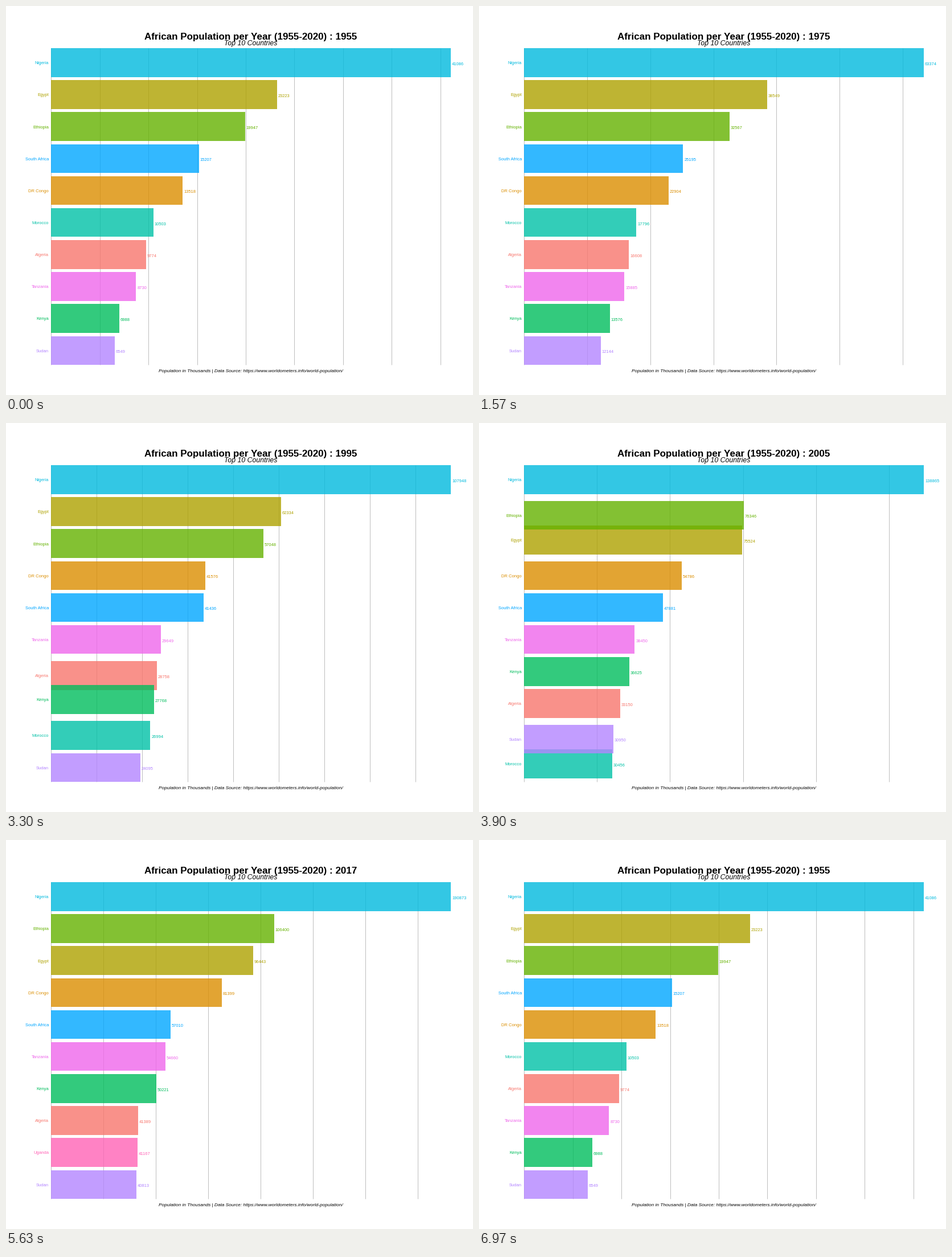
Recreate the animation shown at these times as a matplotlib script. Size 820 by 683 pixels, loop 10000 ms.

```python
import math

import numpy as np
import matplotlib.pyplot as plt
from matplotlib.animation import FuncAnimation
from matplotlib.patches import Rectangle

plt.rcParams["font.family"] = "Liberation Sans"

WIDTH, HEIGHT, DPI = 820, 683, 100
FRAMES, LOOP_MS = 300, 10000
LEFT, SPAN = 79.3, 702
TOP, PITCH, BAR = 74.2, 56.15, 50.5
TITLE = "African Population per Year (1955-2020) : {}"

# Population in thousands at the survey years; the other years are interpolated.
SURVEYS = [*range(1955, 2016, 5), 2017, 2020]
YEARS = [*range(1955, 2016, 5), *range(2016, 2021)]
COUNTRIES = {
    "Algeria": ("#F8766D", [9774, 11058, 12550, 14465, 16608, 19222, 22432, 25759,
                            28758, 31042, 33150, 35977, 39728, 41389, 43851]),
    "DR Congo": ("#DB8E00", [13518, 15248, 17370, 20011, 22904, 26358, 29881, 34612,
                             41576, 47106, 54786, 64564, 76245, 81399, 89561]),
    "Egypt": ("#AEA200", [23223, 26633, 30266, 34514, 38549, 43309, 49259, 56134,
                          62334, 68832, 75524, 82761, 92443, 96443, 102334]),
    "Ethiopia": ("#64B200", [19947, 22151, 25014, 28415, 32567, 35142, 40652, 47888,
                             57048, 66225, 76346, 87640, 100835, 106400, 114964]),
    "Kenya": ("#00BD5C", [6988, 8120, 9549, 11301, 13576, 16417, 19877, 23402,
                          27768, 31965, 36625, 42031, 47878, 50221, 53771]),
    "Morocco": ("#00C1A7", [10503, 12329, 14248, 16000, 17796, 20020, 22499, 24807,
                            26994, 28794, 30456]),
    "Nigeria": ("#00BADE", [41086, 45138, 50128, 55982, 63374, 73424, 83563, 95212,
                            107948, 122284, 138865, 158503, 181137, 190873, 206140]),
    "South Africa": ("#00A6FF", [15207, 17100, 19545, 22070, 25195, 28557, 32679, 36801,
                                 41436, 44968, 47881, 51217, 55386, 57010, 59309]),
    "Sudan": ("#B385FF", [6549, 7544, 8761, 10282, 12144, 14507, 17210, 20147,
                          24095, 27275, 30950, 34545, 38903, 40813, 43849]),
    "Tanzania": ("#EF67EB", [8730, 10052, 11684, 13606, 15885, 18538, 21634, 25204,
                             29649, 33499, 38450, 44347, 51483, 54660, 59734]),
    "Uganda": ("#FF63B6", [32428, 38225, 41167, 45741]),
}


def yearly(values):
    """Map year to population, filling recent gaps with a cubic."""
    years = SURVEYS[-4:] if len(values) == 4 else SURVEYS[:len(values)]
    table = dict(zip(years, values))
    if 2020 in table:
        cubic = np.polyfit(np.array(years[-4:]) - 2015, values[-4:], 3)
        for year in (2016, 2018, 2019):
            table[year] = int(round(np.polyval(cubic, year - 2015)))
    return table


def ranked(year):
    """Map each country of a year to (rank, population)."""
    rows = [(t[year], name) for name, t in TABLES.items() if year in t]
    return {name: (i, v) for i, (v, name) in enumerate(sorted(rows, reverse=True))}


TABLES = {name: yearly(values) for name, (_, values) in COUNTRIES.items()}
STATES = [(year, ranked(year)) for year in YEARS + [1955]]
STEPS = [9] * 8 + [8] + [9] * 4 + [8] * 5
REST = 3


def locate(frame):
    """Return the state a frame leaves and how far it is to the next one."""
    start = REST - 1
    for i, steps in enumerate(STEPS):
        if frame < start + steps + REST:
            return i, min(max(frame - start, 0) / steps, 1)
        start += steps + REST
    return len(STEPS) - 1, 1


def grid_step(top):
    """Half of the best-scoring tick distance for an axis from 0 to top."""
    best = (-9, 1)
    power = 10 ** math.floor(math.log10(top))
    for scale in (power, power / 10):
        for order, q in enumerate((1, 5, 2, 2.5, 4, 3)):
            step = q * scale
            for count in {math.floor(top / step), math.ceil(top / step)} - {0}:
                end = count * step
                cover = 1 - 50 * (1 - end / top) ** 2
                ratio = count / 4 * max(end, top) / end
                density = 2 - max(ratio, 1 / ratio)
                score = 0.25 * (1 - order / 5) + 0.2 * cover + 0.5 * density
                best = max(best, (score, step))
    return best[1] / 2


# The small margin keeps the pixel size from being rounded down.
fig = plt.figure(figsize=((WIDTH + 0.01) / DPI, (HEIGHT + 0.01) / DPI), dpi=DPI,
                 facecolor="white")
ax = fig.add_axes([0, 0, 1, 1])
ax.set(xlim=(0, WIDTH), ylim=(HEIGHT, 0))
ax.axis("off")


def label(x, y, text, px, **style):
    return ax.text(x, y, text, fontsize=px * 72 / DPI, va="baseline", zorder=3, **style)


title = label(429.7, 59, "", 17, ha="center", weight="bold")
label(429.7, 69, "Top 10 Countries", 12.3, ha="center", style="italic")
label(429.7, 643, "Population in Thousands | Data Source: "
      "https://www.worldometers.info/world-population/", 8.3, ha="center", style="italic")

lines = [ax.plot([0, 0], [TOP, 630], color="#BEBEBE", lw=0.72, zorder=1,
                 solid_capstyle="butt")[0] for _ in range(16)]
bars = {}
for country, (color, _) in COUNTRIES.items():
    rect = ax.add_patch(Rectangle((LEFT, 0), 1, BAR, fc=color, lw=0, alpha=0.8, zorder=2))
    bars[country] = (rect, label(75.2, 0, country, 7.6, ha="right", color=color),
                     label(0, 0, "", 7.5, ha="left", color=color))


def update(frame):
    index, t = locate(frame)
    (year_a, a), (year_b, b) = STATES[index], STATES[index + 1]
    title.set_text(TITLE.format(year_b if t >= 0.5 else year_a))
    top = a["Nigeria"][1] * (1 - t) + b["Nigeria"][1] * t

    step = grid_step(top)
    for i, line in enumerate(lines):
        x = LEFT + SPAN * i * step / top
        line.set_xdata([x, x])
        line.set_visible(i * step <= top)

    shown = b if t == 1 else a
    for country, (rect, name, number) in bars.items():
        for artist in (rect, name, number):
            artist.set_visible(country in shown)
        if country not in shown:
            continue
        rank_a, value_a = a.get(country, shown[country])
        rank_b, value_b = b.get(country, shown[country])
        y = TOP + PITCH * (rank_a * (1 - t) + rank_b * t)
        width = SPAN * (value_a * (1 - t) + value_b * t) / top
        rect.set_y(y)
        rect.set_width(width)
        name.set_y(y + 28)
        number.set_position((LEFT + width + 1.8, y + 29.6))
        number.set_text(str(value_b if t >= 0.5 else value_a))
    return []


anim = FuncAnimation(fig, update, frames=FRAMES, interval=LOOP_MS / FRAMES,
                     repeat=True, repeat_delay=0, blit=False)
plt.show()
```
